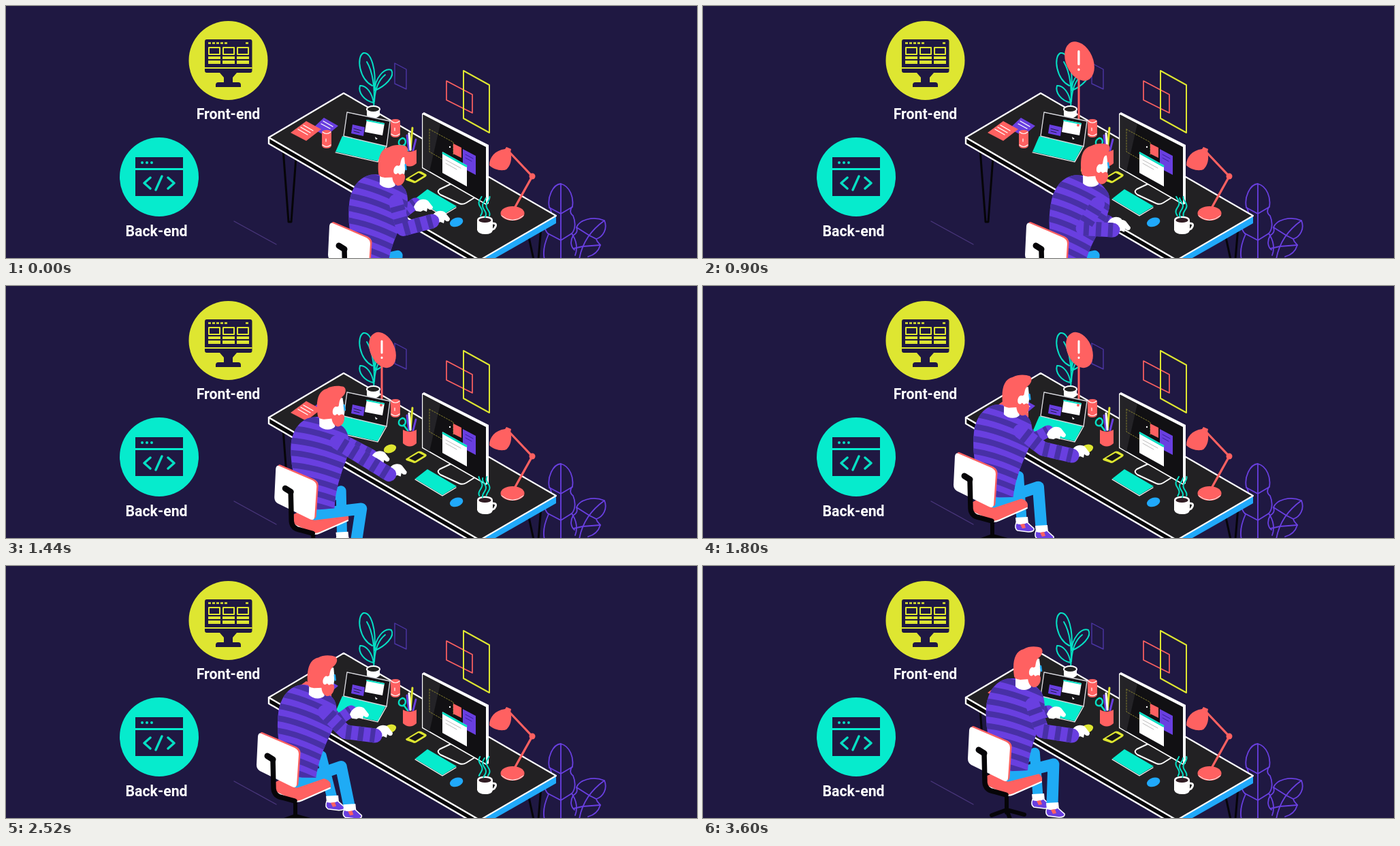
Animation of 1015x370 px, one loop 3630 ms. Source, as an HTML page:

```html
<!DOCTYPE html>
<html lang="en">
<head>
<meta charset="utf-8">
<title>Front-end and back-end</title>
<style>
  html, body { margin: 0; width: 100%; height: 100%; overflow: hidden; background: #1f1842; }
  svg { display: block; width: 100vw; height: 100vh; }
  text { font: 700 21.3px Roboto, Arial, sans-serif; fill: #fff; text-anchor: middle; }
  .line { fill: none; stroke-linecap: round; stroke-linejoin: round; }
  .ink { fill: #1f1842; } .lime { fill: #dee631; } .teal { fill: #06ebcd; }
  .coral { fill: #ff6161; } .white { fill: #fff; } .violet { fill: #693fe0; }
  .sTeal { stroke: #06dfc4; } .sCoral { stroke: #ff6161; } .sWhite { stroke: #fff; }
  .sViolet { stroke: #693fe0; } .sLime { stroke: #dee631; } .sBlack { stroke: #060508; }
  .sBlue { stroke: #1fabf5; } .sStripe { stroke: #4830a6; }
</style>
</head>
<body>
<svg viewBox="0 0 1015 370" preserveAspectRatio="none">
  <defs>
    <path id="torsoShape" d="M455 165C437 164 419 177 416 207C414 238 421 270 438 302L477 300C479 274 487 254 493 238C502 220 505 199 497 185C488 173 472 165 455 165Z"/>
    <clipPath id="torsoClip"><use href="#torsoShape"/></clipPath>
    <path id="panel" d="M396 237L445 258Q451 261 451 267L448 312Q447 318 441 315L394 292Q389 289 389 283L391 241Q392 235 396 237Z"/>
    <path id="palm" class="white" d="M-13 3C-9 -8 1 -11 8 -6L15 3Q15 8 10 7L7 5L6 10L1 8L-3 10L-10 9Z"/>
    <g id="shoe">
      <path class="white" d="M-9 -3L9 -4L10 6L-8 7Z"/>
      <path class="violet sWhite" stroke-width="1.5" d="M-8 5Q0 8 8 4L18 13Q19 18 10 18L-6 16Q-11 13 -8 5Z"/>
      <path class="coral" d="M-2 7L4 6L6 12L1 13Z"/>
    </g>
    <g id="can">
      <path class="coral" d="M-7 -9Q-7 -13 0 -13Q7 -13 7 -9V10Q6 14 0 14Q-6 14 -7 10Z"/>
      <path class="line sWhite" stroke-width="1.2" d="M-6 -10Q0 -5 6 -10M-6 9Q0 14 6 9M-1 0V4"/>
    </g>
    <g id="tile">
      <path class="line sLime" stroke-width="2" d="M1 1h16v10h-16z"/>
      <path class="lime" d="M0 14h18v4h-18zM0 20h18v5h-18z"/>
    </g>
  </defs>

  <rect class="ink" width="1015" height="370"/>

  <!-- badges -->
  <circle class="lime" cx="326.5" cy="80" r="58"/>
  <rect class="ink" x="292" y="49" width="69.500" height="49" rx="3"/>
  <path class="sLime" stroke-width="2.500" stroke-dasharray="4 2" d="M297 54.500H326M352 54.500h4"/>
  <use href="#tile" x="297" y="60"/><use href="#tile" x="318" y="60"/><use href="#tile" x="339" y="60"/>
  <path class="sLime" stroke-width="2" d="M292 91H361.500"/>
  <path class="ink" d="M314 98H339L333 105V112H341Q345 112 345 116V119H308V116Q308 112 312 112H320V105Z"/>
  <text x="326.5" y="166.4">Front-end</text>

  <circle class="teal" cx="225" cy="251" r="58"/>
  <path class="ink" d="M190 222h70v16h-70zM190 241h70v38h-70z"/>
  <path class="line sTeal" stroke-width="4" stroke-dasharray="0 7" d="M200 230H215"/>
  <path class="line sTeal" stroke-width="3.4" d="M212 252L203 260L212 268M229 250L220 270M238 252L247 260L238 268"/>
  <text x="221" y="338.400">Back-end</text>

  <!-- wall and floor -->
  <path class="line" stroke="#49367c" stroke-width="1.3" d="M335 316L397 350"/>
  <path class="line" stroke="#4c35a4" stroke-width="1.4" d="M571 84L588 93V122L571 114Z"/>
  <path class="line sCoral" stroke-width="1.7" d="M647 110L685 130V157L647 138Z"/>
  <path class="line sLime" stroke-width="2" d="M672 95L710 116V186L672 165Z"/>
  <g class="line sViolet" stroke-width="1.800">
    <path d="M815 372V261C803 262 795 281 798 295C803 302 801 306 795 309C789 322 791 330 797 335C792 346 788 360 791 372M815 261C829 265 834 282 832 294C827 301 829 305 833 308C838 320 835 330 831 334C838 344 840 356 836 366"/>
    <path d="M798 296L815 305L832 295M796 334L815 344L831 334"/>
    <path d="M842 372C846 348 858 330 879 315C862 308 842 314 838 325C840 331 838 334 833 337C828 346 830 354 835 358M879 315C884 327 877 339 867 342C868 347 872 349 873 351C870 361 863 366 855 368"/>
    <path d="M838 325L857 337L867 342M834 356L847 353L873 351"/>
  </g>

  <!-- desk -->
  <path class="line sBlack" stroke-width="3" d="M407 210L415 317H419L426 222M767 335L775 372M786 325L782 372"/>
  <path fill="#08070a" stroke="#fff" stroke-width="2.400" stroke-linejoin="round" d="M386 193V202L696 382V373Z"/>
  <path fill="#20a9fb" d="M808 309V319L696 383V373Z"/>
  <path fill="#222123" stroke="#fff" stroke-width="2.200" stroke-linejoin="round" d="M496 128L808 308L696 373L386 193Z"/>

  <!-- plant -->
  <g class="line sTeal" stroke-width="2">
    <path d="M540 149C543 120 538 95 530 82M538 117C519 107 514 75 525 69C537 67 544 96 541 121"/>
    <path d="M541 140C542 122 548 108 557 101M542 124C541 108 555 90 566 94C572 104 556 118 542 124"/>
    <path d="M540 142C526 139 517 127 520 117C530 116 538 129 540 142"/>
  </g>

  <g id="sign">
    <path class="line sCoral" stroke-width="3" d="M552 165V105"/>
    <g id="disc">
      <ellipse class="coral" rx="18" ry="27.500" transform="rotate(-24)"/>
      <path class="line sWhite" stroke-width="3" d="M-1 -13V4M-1 11V11.500"/>
    </g>
  </g>
  <path class="white" d="M530 152V161Q539 169 549 161V152Z"/>
  <ellipse cx="539.500" cy="151.500" rx="9.500" ry="4.500" fill="#222" stroke="#fff" stroke-width="2"/>

  <!-- desk items -->
  <path class="violet" d="M467 164L488 176L470 191L450 180Z"/>
  <path class="coral" d="M441 169L463 181L441 198L418 186Z"/>
  <path class="line sWhite" stroke-width="1.300" d="M437 175L451 183M433 178L447 186M429 181L443 189M466 169L480 177M463 173L476 180"/>
  <use href="#can" x="471" y="195"/><use href="#can" x="572" y="179"/>

  <path class="teal" d="M494 191L558 205L546 228L484 214Z"/>
  <path class="line sWhite" stroke-width="1.200" d="M484 215L546 229L559 206"/>
  <path fill="#151417" stroke="#d9d9df" stroke-width="1.400" stroke-linejoin="round" d="M501 156L564 169L559 206L496 191Z"/>
  <path class="violet" d="M509 174L527 178L525 191L507 187Z"/>
  <path class="line" stroke="#1f1842" d="M511 180L522 183M511 184L519 186"/>
  <path class="white" d="M530 167L556 172L553 190L527 185ZM542 192l4 3l-3 1z"/>
  <path class="line sTeal" stroke-width="2" d="M530 168L555 173"/>
  <circle id="notice" class="coral" cx="551" cy="175" r="2"/>

  <path class="lime" d="M587 254L605 243Q607 242 610 243L617 247Q619 249 616 251L603 259Q600 261 597 259L588 256Z"/>
  <path fill="#17161a" d="M592 253L606 245L614 249L601 257Z"/>
  <ellipse class="lime" cx="564" cy="239" rx="9.500" ry="6" transform="rotate(-18 564 239)"/>

  <path class="line sLime" stroke-width="3" d="M597 179L594 211"/>
  <path class="line sViolet" stroke-width="3" d="M589 190L592 212M602 196L598 212"/>
  <path class="line sWhite" stroke-width="3" d="M592 187L594 211"/>
  <path class="line sTeal" stroke-width="2.500" d="M582 194C574 198 576 207 584 205C589 201 587 194 582 194M584 204L590 212"/>
  <path class="coral" d="M583 211V231Q593 240 603 231V211Q593 217 583 211Z"/>

  <path class="line sWhite" stroke-width="2" d="M656 260L637 269Q632 273 638 277L666 290Q671 292 676 289L692 279"/>
  <path class="white" d="M611 158L614 156L709 204V290L705 292L611 238Z"/>
  <path fill="#111013" d="M612.500 159.500L705 207V290L612.500 237Z"/>
  <path fill="#242327" d="M612.500 159.500L638 173L622 243L612.500 237Z"/>
  <path class="line" stroke="#837e2e" stroke-dasharray="2 2" d="M622 181L657 200V218M622 181V214L641 225"/>
  <path class="coral" d="M657 202L669 208V223L657 217Z"/>
  <path class="violet" d="M671 210L690 220V248L671 238Z"/>
  <path class="line" stroke="#35209c" d="M675 218L686 224M675 223L684 228"/>
  <path class="white" d="M641 214L677 234V265L641 245Z"/>
  <path class="line sTeal" stroke-width="3" d="M642 216L676 235"/>
  <path class="line" stroke="#bbb" d="M646 226L668 238M646 231L662 240"/>
  <circle class="white" cx="652" cy="207" r="1.200"/>

  <path class="teal" d="M601 283L619 269L662 294L641 307Z"/>
  <path class="line sWhite" stroke-width="1.200" d="M601 284L641 308L661 296"/>
  <ellipse cx="661.500" cy="317.500" rx="10" ry="6.500" fill="#20a9fb" transform="rotate(-18 661 317)"/>

  <ellipse class="coral" cx="744" cy="304.500" rx="17.500" ry="10.500"/>
  <path class="line sWhite" stroke-width="1" d="M728 308Q744 321 760 308"/>
  <path class="line sCoral" stroke-width="3.200" d="M744 302L773 250L738 213"/>
  <circle class="coral" cx="773" cy="250" r="4.500"/>
  <path class="coral" d="M710 234C710 222 718 212 733 210L735 207L742 210L741 215C744 224 741 235 735 240C728 243 716 240 710 234Z"/>

  <path class="line sWhite" stroke-width="3" d="M715 319Q723 319 717 327L711 330"/>
  <path class="white" d="M692 314V329Q694 335 704 335Q714 335 715 329V314Z"/>
  <ellipse cx="703.500" cy="314" rx="11.500" ry="5.500" class="white"/>
  <ellipse cx="703.500" cy="314.500" rx="9" ry="3.600" fill="#301c23"/>
  <path id="steam" class="line sTeal" stroke-width="2"/>

  <!-- worker -->
  <path id="wheels" class="line sBlack" stroke-width="6" d="M446 330V362M446 358L424 366M446 358L472 365M446 358L452 374"/>
  <path id="farLeg" class="line sBlue" stroke-width="15"/>
  <use id="farShoe" href="#shoe"/>
  <g id="seat">
    <path class="coral" d="M413 310L455 290L493 305Q498 308 498 313V316L456 335Q449 338 443 335L413 321Z"/>
    <path class="line sWhite" stroke-width="2" d="M415 322L444 336Q449 338 456 335L497 317"/>
  </g>
  <path id="nearLeg" class="line sBlue" stroke-width="17"/>
  <use id="nearShoe" href="#shoe"/>
  <g id="farArm" class="line" stroke-width="17"><path class="sViolet"/><path class="sStripe"/></g>
  <use id="farHand" href="#palm"/>
  <g id="torso">
    <use href="#torsoShape" class="violet"/>
    <g id="stripes" class="line sStripe" stroke-width="8.500" clip-path="url(#torsoClip)"></g>
  </g>
  <use id="nearHand" href="#palm"/>
  <g id="nearArm" class="line" stroke-width="21"><path class="sViolet"/><path class="sStripe"/></g>
  <g id="head">
    <path class="white" d="M-9 -18L12 -14L14 -2C8 4 -3 3 -9 -3Z"/>
    <path class="white" d="M14 -44L26 -44L28 -28L26 -12L11 -13Z"/>
    <path class="coral" d="M-11 -18C-14 -40 -10 -55 3 -58C11 -63 23 -62 28 -60C33 -56 30 -49 25 -45C21 -42 21 -37 20 -32L14 -29L11 -14L-2 -13C-8 -14 -10 -15 -11 -18Z"/>
    <path class="coral" d="M9 -18C12 -23 17 -22 20 -18C24 -21 28 -20 28 -15C28 -7 23 -1 17 -2C12 -4 9 -9 9 -18Z"/>
    <ellipse class="white" cx="15" cy="-25" rx="4" ry="6.500" transform="rotate(14 15 -25)"/>
    <path class="line sBlue" stroke-width="2.500" d="M28 -33L29 -26"/>
  </g>
  <g id="chair">
    <use href="#panel" class="coral" x="2.500" y="-1.500"/>
    <use href="#panel" class="white"/>
    <path class="line sBlack" stroke-width="9" d="M405 270L413 275"/>
    <path class="line sBlack" stroke-width="7.500" d="M413 275L414 318Q415 329 427 331L445 336"/>
  </g>
</svg>
<script>
const LOOP = 3630, STEP = 30;
const $ = id => document.getElementById(id);
const draw = (node, d) => node.setAttribute('d', d);
const move = (id, [x, y], more = '') => $(id).setAttribute('transform', `translate(${x} ${y}) ${more}`);
const add = ([x, y], dx, dy) => [x + dx, y + dy];
const mix = (a, b, u) => a.map((v, i) => v + (b[i] - v) * u);

// eased 0 to 1 between two times
function ramp(t, from, to) {
  const u = Math.min(1, Math.max(0, (t - from) / (to - from)));
  return (1 - Math.cos(Math.PI * u)) / 2;
}

// walk through three places with two eased progress values
const route = (a, b, c, u, v) => mix(mix(a, b, u), c, v);

// middle joint of a two-part limb; side picks the bend
function joint([x0, y0], [x1, y1], upper, lower, side) {
  const dx = x1 - x0, dy = y1 - y0, dist = Math.hypot(dx, dy);
  const stretch = Math.max(1, dist / (upper + lower));
  const a = upper * stretch, b = lower * stretch;
  const along = (a * a - b * b + dist * dist) / (2 * dist);
  const out = side * Math.sqrt(Math.max(0, a * a - along * along));
  return [x0 + (dx * along - dy * out) / dist, y0 + (dy * along + dx * out) / dist];
}

function turn([x, y], [px, py], degrees) {
  const a = degrees * Math.PI / 180, dx = x - px, dy = y - py;
  return [px + dx * Math.cos(a) - dy * Math.sin(a), py + dx * Math.sin(a) + dy * Math.cos(a)];
}

function arm(side, shoulder, hand, tap) {
  const wrist = add(hand, -11, side === 'near' ? 7 : -2);
  const elbow = side === 'near' ? joint(shoulder, wrist, 42, 44, 1) : joint(shoulder, wrist, 24, 24, 1);
  for (const p of $(side + 'Arm').children) draw(p, `M${shoulder}L${elbow}L${wrist}`);
  move(side + 'Hand', add(hand, 0, tap));
}

function leg(side, hip, foot, thigh, shin) {
  draw($(side + 'Leg'), `M${hip}L${joint(hip, foot, thigh, shin, -1)}L${foot}`);
  move(side + 'Shoe', foot);
}

function steam(t) {
  let d = '';
  for (let k = 0; k < 3; k++) {
    for (let y = 0; y <= 28; y += 2) {
      const x = 697 + k * 5.5 + 2.5 * Math.sin(y / 4 + k / 2 - t / LOOP * Math.PI * 12);
      d += `${y ? 'L' : 'M'}${x.toFixed(1)} ${310 - y - (k === 1 ? 0 : 2)}`;
    }
  }
  draw($('steam'), d);
}

function sign(t) {
  const pop = ramp(t, 690, 860), settle = ramp(t, 900, 1080), fade = ramp(t, 2040, 2230);
  $('sign').setAttribute('opacity', pop ? 1 - fade : 0);
  move('disc', [553, 120 - 39 * pop + 13 * settle], `scale(${pop * (1.1 - .1 * settle)})`);
  $('notice').setAttribute('opacity', pop > 0 && t < 2040 ? 1 : 0);
}

function render(t) {
  const push = ramp(t, 600, 900), roll = ramp(t, 1080, 1620);
  const reach = ramp(t, 1140, 1640), sit = ramp(t, 2700, 3300);
  const nod = ramp(t, 60, 510) - ramp(t, 1080, 1440);
  const lean = 3 + 5 * push - 10 * ramp(t, 1080, 1440) + 7 * ramp(t, 1440, 2100)
    - 3 * ramp(t, 2220, 2820) - 2 * ramp(t, 2820, 3300);

  const chair = route([84, 82], [-21, 9], [0, 0], roll, sit);
  for (const id of ['chair', 'seat', 'wheels']) move(id, chair);

  const hip = [450, 290];
  const body = (x, y) => add(turn([x, y], hip, lean), ...chair);
  move('torso', chair, `rotate(${lean} ${hip})`);
  move('head', add(body(468, 180), 0, 2 - 4 * nod - 2 * sit), `rotate(${.6 * lean - 5 * nod})`);

  const tap = 1.5 * Math.sin(t / 50);
  const typing = t < 600, left = t > 1950;
  arm('near', body(484, 203), route([637, 309], [613, 322], [553, 242], push, reach), typing ? tap : 0);
  arm('far', body(487, 197), route([612, 292], [606, 318], [518, 215], push, reach), typing || left ? -tap : 0);

  const step = ramp(t, 2250, 2820);
  leg('near', add(chair, 448, 308), route([560, 480], [497, 355], [513, 351], roll, step), 69, 60);
  leg('far', add(chair, 456, 292), route([570, 430], [468, 343], [492, 338], roll, step), 36, 64);

  sign(t);
  steam(t);
}

for (let y = 162; y < 310; y += 18) {
  const p = document.createElementNS('http://www.w3.org/2000/svg', 'path');
  draw(p, `M408 ${y}Q452 ${y + 2} 512 ${y + 32}`);
  $('stripes').append(p);
}
for (const id of ['nearArm', 'farArm']) {
  const bands = $(id).lastElementChild;
  bands.style.strokeLinecap = 'butt';
  bands.style.strokeDasharray = '8 10';
  bands.style.strokeDashoffset = '-7';
}

function tick() {
  const t = performance.now() % LOOP;
  render(Math.floor(t / STEP) * STEP);
  requestAnimationFrame(tick);
}
tick();
</script>
</body>
</html>
```
